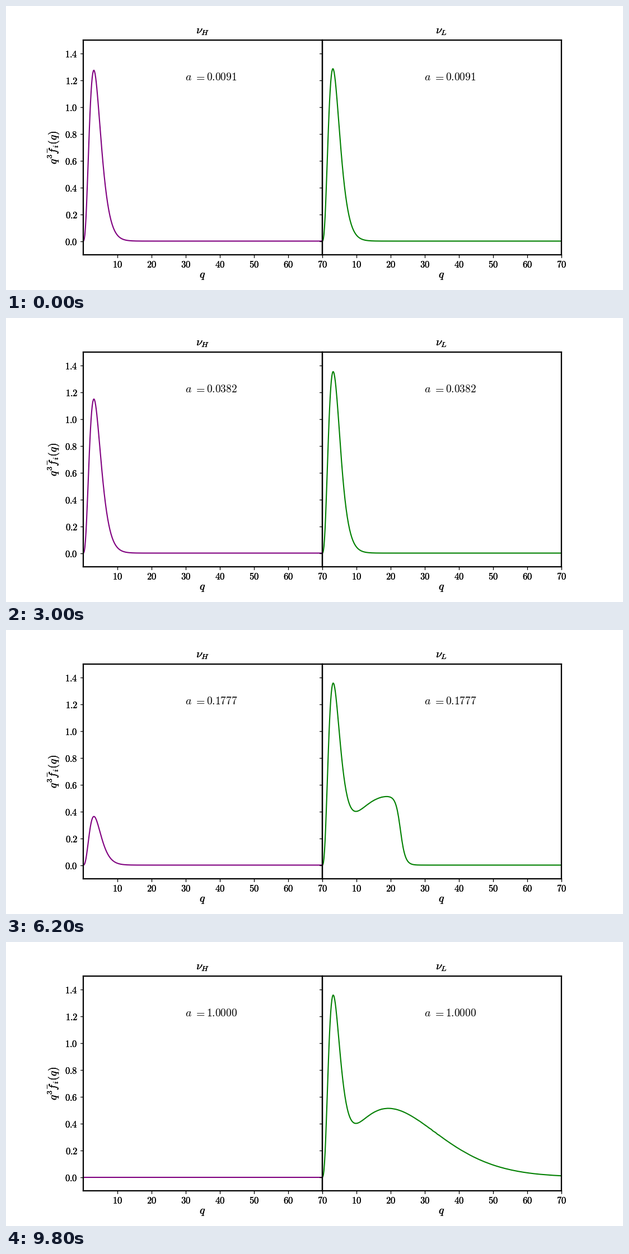
Recreate the animation shown at these times as a matplotlib script. Size 1102 px wide and 508 px high, loop 10000 ms.

```python
import numpy as np
import matplotlib.pyplot as plt
from matplotlib.animation import FuncAnimation

plt.rcParams["mathtext.fontset"] = "cm"
plt.rcParams["axes.linewidth"] = 1.5

W, H, DPI = 1102, 508, 100
FRAMES, INTERVAL = 50, 200
LEFT, MID, RIGHT = 0.125, 0.5125, 0.9
BOTTOM, TOP = 0.125, 0.88

# Scale factor: close to logarithmic in time
KEY_FRAMES = [0, 7, 15, 24, 31, 43, 49]
KEY_SCALES = [0.0091, 0.0178, 0.0382, 0.0909, 0.1777, 0.5593, 1.0]
log_scale = np.interp(np.arange(FRAMES), KEY_FRAMES, np.log(KEY_SCALES))

# Two-body decay of a heavy thermal relic, in units of its temperature
MASS = 330.0
KICK = 128.5                                   # daughter momentum at rest
LIGHT = np.sqrt(MASS**2 - 2 * MASS * KICK)     # daughter mass
ENERGY = np.hypot(KICK, LIGHT)
RATE = 25.78
BUMP = 0.513
SUBSTEPS = 16

q = np.linspace(0, 70, 421)
edges = np.linspace(-0.5, 420.5, 422) * (q[1] - q[0])
edges[0] = 0
parent = (np.arange(48) + 0.5) * 0.3
thermal = q**3 / (np.exp(q) + 1)
parent_count = parent**2 / (np.exp(parent) + 1) * 0.3


def rate(p, a):
    """Decay rate per unit of ln a, slowed by time dilation."""
    return RATE * a**1.5 * a / np.hypot(a, p / MASS)


def daughters_below(a):
    """Share of daughters born at a with momentum below each edge."""
    boost = parent[:, None] / (MASS * a)
    middle = np.hypot(1, boost) * ENERGY * a
    half = boost * KICK * a
    energy = np.hypot(edges, LIGHT * a)[None, :]
    return np.clip((energy - middle + half) / (2 * half), 0, 1)


def evolve():
    depth = np.zeros_like(q)
    parent_depth = np.zeros_like(parent)
    born = np.zeros_like(edges)
    heavy, light = [], []
    start = np.log(1e-3)
    for end in log_scale:
        count = SUBSTEPS if heavy else 10 * SUBSTEPS
        step = (end - start) / count
        for k in range(count):
            a = np.exp(start + (k + 0.5) * step)
            depth += rate(q, a) * step
            loss = rate(parent, a) * step
            decayed = parent_count * np.exp(-parent_depth) * -np.expm1(-loss)
            parent_depth += loss
            born += decayed @ daughters_below(a)
        heavy.append(thermal * np.exp(-depth))
        light.append(q * np.diff(born) / np.diff(edges))
        start = end
    light = np.array(light)
    light *= BUMP / light[-1].max()
    return np.array(heavy), thermal + light


heavy, light = evolve()

fig = plt.figure(figsize=(W / DPI, H / DPI), dpi=DPI, facecolor="white")


def put(x, y, s, size, **kw):
    return fig.text(x / W, 1 - y / H, s, fontsize=size, color="black", **kw)


def panel(x0, x1, labelled):
    ax = fig.add_axes([x0, BOTTOM, x1 - x0, TOP - BOTTOM])
    ax.patch.set_visible(False)
    ax.set_xlim(0, 70)
    ax.set_ylim(-0.1, 1.5)
    xs = range(10, 71, 10)
    ys = np.arange(8) * 0.2
    ax.set_xticks(xs, labels=[f"${v}$" for v in xs])
    ax.set_yticks(ys, labels=[f"${v:.1f}$" if labelled else "" for v in ys])
    ax.tick_params(labelsize=12)
    return ax


# Frames and labels are layered to give them a heavier, crisper stroke
for layer in range(3):
    ax_h = panel(LEFT, MID, True)
    ax_l = panel(MID, RIGHT, False)
    if layer == 0:
        line_h, = ax_h.plot(q, heavy[0], color="purple", lw=1.5)
        line_l, = ax_l.plot(q, light[0], color="green", lw=1.5)
    for x, name in ((351, "H"), (778, "L")):
        put(x, 50, rf"$\nu_{name}$", 14.5, ha="center", va="baseline")
        put(x - 0.5, 486, "$q$", 14.5, ha="center", va="baseline")
    put(97.5, 252.7, r"$q^3\bar{f}_i(q)$", 14.5, rotation=90,
        ha="right", va="center")

numbers = []
for x in (320, 747):
    put(x, 133, "$a$", 14.3, va="baseline")
    put(x + 16, 133, "$=$", 14.3, va="baseline")
    numbers.append(put(x + 38.3, 133, "", 14, va="baseline"))


def update(i):
    line_h.set_ydata(heavy[i])
    line_l.set_ydata(light[i])
    for number in numbers:
        number.set_text(f"${np.exp(log_scale[i]):.4f}$")
    return [line_h, line_l, *numbers]


anim = FuncAnimation(fig, update, frames=FRAMES, interval=INTERVAL,
                     repeat=True, repeat_delay=0, blit=False)
plt.show()
```
